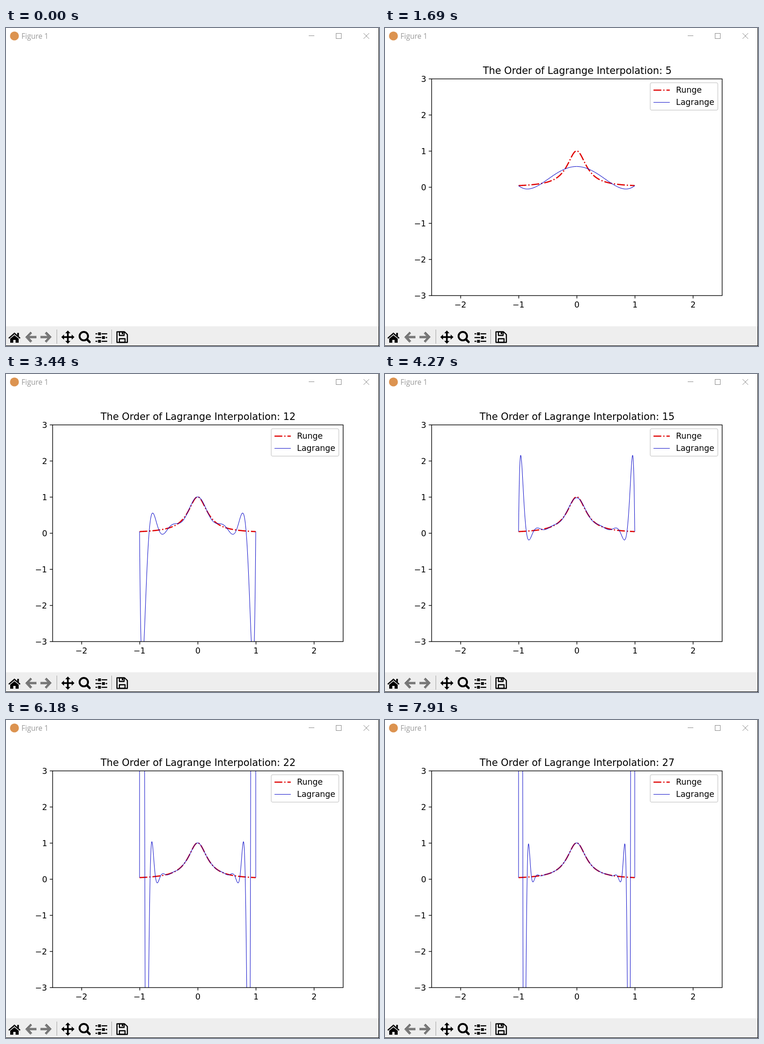
Recreate the animation shown at these times as an HTML page with a canvas. Size 796 by 678 pixels, loop 8000 ms.

```html
<!DOCTYPE html>
<html lang="en">
<head>
<meta charset="utf-8">
<title>Figure 1</title>
<style>
html, body { margin: 0; width: 100%; height: 100%; overflow: hidden; background: #fff; }
canvas { display: block; }
</style>
</head>
<body>
<canvas id="stage" width="796" height="678"></canvas>
<script>
const ctx = document.getElementById('stage').getContext('2d');
const LOOP = 8000;
const PT = 125 / 72;
const FONT = 10 * PT;
const HAIR = 0.8 * PT;
const AXES = { x: 99, y: 108, w: 620, h: 462 };
const RED = '#e00505';
const BLUE = '#0a0ac8';
const BAR = '#eeeeee';
const DASH_DOT = [6.4, 1.6, 1, 1.6].map(d => d * 1.5 * PT);

const toX = x => 409 + 124 * x;
const toY = y => 339 - 77 * y;
const runge = x => 1 / (1 + 25 * x * x);

// Each redraw takes a little longer than the one before.
const startOf = n => 650 + 216.5 * (n - 1) + 2.03 * (n * n - 1);

function orderAt(t) {
  let n = 0;
  while (startOf(n + 1) <= t) n++;
  return n;
}

// Barycentric form of the interpolant on n + 1 evenly spaced nodes.
function lagrange(n) {
  const nodes = [];
  for (let i = 0, w = 1; i <= n; i++) {
    const x = -1 + 2 * i / n;
    nodes.push({ x, w, y: runge(x) });
    w *= -(n - i) / (i + 1);
  }
  return x => {
    let top = 0, bottom = 0;
    for (const p of nodes) {
      const d = x - p.x;
      if (Math.abs(d) < 1e-12) return p.y;
      top += p.w / d * p.y;
      bottom += p.w / d;
    }
    return top / bottom;
  };
}

function line(points, width, color = '#000', dash = []) {
  ctx.beginPath();
  points.forEach(([x, y]) => ctx.lineTo(x, y));
  ctx.lineWidth = width;
  ctx.strokeStyle = color;
  ctx.setLineDash(dash);
  ctx.stroke();
  ctx.setLineDash([]);
}

function triangle(x, y, halfWidth, height) {
  ctx.beginPath();
  ctx.moveTo(x, y);
  ctx.lineTo(x + halfWidth, y + height);
  ctx.lineTo(x - halfWidth, y + height);
  ctx.fillStyle = '#000';
  ctx.fill();
}

function rect(x, y, w, h, color = '#000') {
  ctx.fillStyle = color;
  ctx.fillRect(x, y, w, h);
}

function frame(x, y, w, h, width, color = '#000') {
  ctx.lineWidth = width;
  ctx.strokeStyle = color;
  ctx.strokeRect(x + 0.5, y + 0.5, w, h);
}

function circle(x, y, r) {
  ctx.beginPath();
  ctx.arc(x, y, r, 0, 2 * Math.PI);
}

// Aligns the inked box of the text: anchor 0 is left, 0.5 centre, 1 right.
function text(str, x, y, size, anchor = 0) {
  ctx.font = `${size}px "DejaVu Sans", sans-serif`;
  ctx.fillStyle = '#000';
  const m = ctx.measureText(str);
  const ink = m.actualBoundingBoxLeft + m.actualBoundingBoxRight;
  ctx.fillText(str, Math.round(x - anchor * ink) + m.actualBoundingBoxLeft, y);
}

function plot(fn, width, color, dash) {
  const points = [];
  for (let k = 0; k <= 500; k++) {
    const x = -1 + k / 250;
    points.push([toX(x), toY(fn(x))]);
  }
  line(points, width, color, dash);
}

function makeStipple() {
  const tile = document.createElement('canvas');
  tile.width = tile.height = 2;
  const g = tile.getContext('2d');
  g.fillRect(0, 0, 1, 1);
  g.fillRect(1, 1, 1, 1);
  return ctx.createPattern(tile, 'repeat');
}
const STIPPLE = makeStipple();

function drawTitleBar() {
  const grey = '#888';
  circle(18, 17, 9.5);
  ctx.fillStyle = '#dc9350';
  ctx.fill();
  ctx.font = '15.5px "Open Sans", sans-serif';
  ctx.fillStyle = '#999';
  ctx.fillText('Figure 1', 33, 23);
  rect(646, 16, 12, 1, grey);
  frame(704, 11, 11, 11, 1, grey);
  for (const s of [-6, 6]) line([[769 - s, 11], [769 + s, 23]], 1, grey);
}

function drawHome() {
  line([[6, 661.5], [18, 651], [30, 661.5]], 2.8);
  rect(24, 650, 3.5, 7);
  triangle(18, 655, 9, 7.5);
  rect(9, 662, 18, 9);
  rect(15.5, 665, 5, 6, BAR);
}

function drawArrow(tip, dir) {
  const at = d => tip + d * dir;
  line([[at(13), 649], [at(3.5), 659], [at(13), 669]], 5, STIPPLE);
  line([[at(4), 659], [at(24), 659]], 5, STIPPLE);
}

function drawMove() {
  ctx.save();
  ctx.translate(132, 659);
  for (let i = 0; i < 4; i++) {
    rect(-1.8, -10, 3.6, 10);
    triangle(0, -14, 5.5, 5.8);
    ctx.rotate(Math.PI / 2);
  }
  ctx.restore();
}

function drawSearch() {
  circle(166, 657, 9);
  ctx.lineWidth = 4;
  ctx.strokeStyle = '#000';
  ctx.stroke();
  ctx.lineCap = 'round';
  line([[173, 664], [178.5, 669.5]], 4.6);
  ctx.lineCap = 'butt';
}

function drawSliders() {
  for (let i = 0; i < 3; i++) {
    const y = 652 + 8 * i;
    const knob = i === 1 ? 205 : 196.5;
    rect(191, y - 1.2, 25, 2.4);
    rect(knob - 1.5, y - 2, 9, 4, BAR);
    rect(knob, y - 3, 6, 6);
  }
}

function drawSave() {
  ctx.lineJoin = 'round';
  ctx.lineWidth = 2.4;
  ctx.strokeStyle = '#000';
  ctx.stroke(new Path2D('M236.8 647.8 H253 L259 653.5 V670.2 H236.8 Z'));
  ctx.strokeRect(242, 648, 10, 7.5);
  ctx.strokeRect(242, 662.5, 12, 7.5);
  ctx.lineJoin = 'miter';
  rect(247, 648, 3, 5);
}

function drawToolbar() {
  rect(0, 636, 796, 42, BAR);
  for (const x of [108, 225]) rect(x, 643, 1, 30, '#a0a0a0');
  drawHome();
  drawArrow(41, 1);
  drawArrow(97.5, -1);
  drawMove();
  drawSearch();
  drawSliders();
  drawSave();
  rect(795, 0, 1, 678);
  rect(0, 677, 796, 1);
}

function drawLegend() {
  ctx.beginPath();
  ctx.roundRect(566, 116.7, 144.3, 58.5, 3.5);
  ctx.fillStyle = '#fff';
  ctx.fill();
  ctx.lineWidth = PT;
  ctx.strokeStyle = '#d6d6d6';
  ctx.stroke();
  const entry = (name, y, ...style) => {
    line([[573, y], [573 + 2 * FONT, y]], ...style);
    text(name, 621.6, y + 5.5, FONT);
  };
  entry('Runge', 132.5, 1.5 * PT, RED, DASH_DOT);
  entry('Lagrange', 158.5, 0.6 * PT, BLUE);
}

function drawAxes() {
  const label = v => (v < 0 ? '\u2212' : '') + Math.abs(v);
  frame(AXES.x, AXES.y, AXES.w, AXES.h, HAIR);
  for (let v = -3; v <= 3; v++) {
    const y = toY(v);
    line([[93.4, y + 0.5], [99.5, y + 0.5]], HAIR);
    text(label(v), 86.9, y + 7, FONT, 1);
  }
  for (let v = -2; v <= 2; v++) {
    const x = toX(v);
    line([[x + 0.5, 570.5], [x + 0.5, 576.6]], HAIR);
    text(label(v), x, 596, FONT, 0.5);
  }
}

function drawFigure(order) {
  ctx.save();
  ctx.beginPath();
  ctx.rect(AXES.x, AXES.y, AXES.w, AXES.h);
  ctx.clip();
  plot(runge, 1.5 * PT, RED, DASH_DOT);
  plot(lagrange(order), 0.6 * PT, BLUE);
  ctx.restore();
  drawAxes();
  drawLegend();
  text(`The Order of Lagrange Interpolation: ${order}`, 409, 98, 12 * PT, 0.5);
}

let shown = -1;
function tick(now) {
  const order = orderAt(now % LOOP);
  if (order !== shown) {
    shown = order;
    rect(0, 0, 796, 678, '#fff');
    drawTitleBar();
    drawToolbar();
    if (order) drawFigure(order);
  }
  requestAnimationFrame(tick);
}
tick(0);
</script>
</body>
</html>
```
